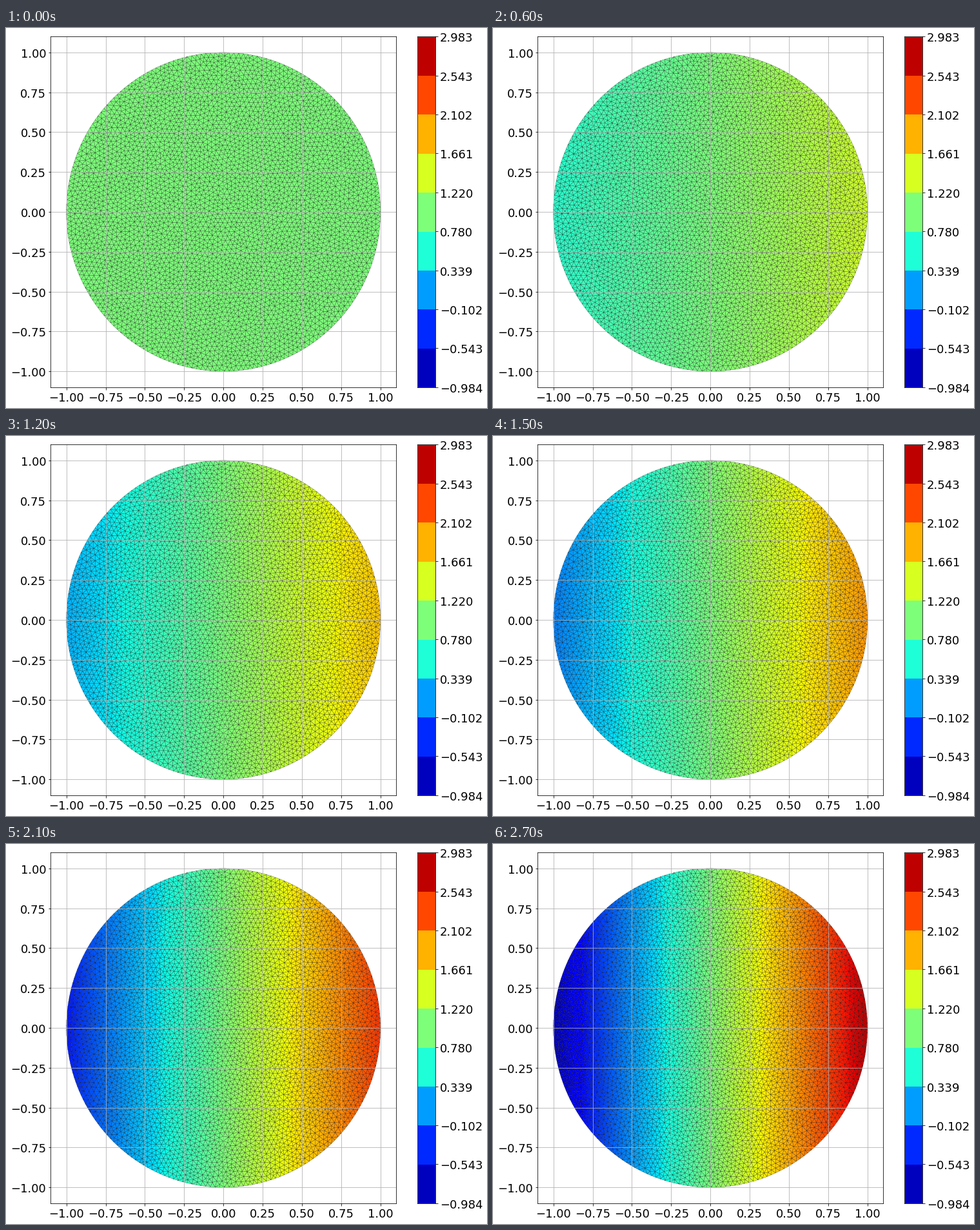
Animation of 746x589 px, one loop 3 s. Source, as a matplotlib script:

```python
import numpy as np
import matplotlib.pyplot as plt
from matplotlib.animation import FuncAnimation
from matplotlib.colors import ListedColormap
from matplotlib.transforms import ScaledTranslation
from matplotlib.tri import Triangulation

WIDTH, HEIGHT, DPI = 746, 589, 72
FRAMES, INTERVAL = 10, 300
VMIN, VMAX, BANDS = -0.9836, 2.9834, 9
EDGE = 0.03
TOP, AXES_HEIGHT = 13.2, 543.6

plt.rcParams.update({"font.family": "DejaVu Sans", "font.size": 18})


def disk_mesh(edge, relax_steps=12, seed=4):
    """Irregular, evenly graded triangulation of the unit disk."""
    rng = np.random.default_rng(seed)
    cell = edge * np.sqrt(np.sqrt(3) / 2)
    axis = np.arange(-1, 1, cell)
    inner = np.stack(np.meshgrid(axis, axis), axis=-1).reshape(-1, 2)
    inner = inner + rng.uniform(0, cell, inner.shape)
    inner = inner[np.hypot(*inner.T) < 1 - 0.55 * edge]

    angle = np.linspace(0, 2 * np.pi, round(2 * np.pi / edge), endpoint=False)
    rim = np.column_stack([np.cos(angle), np.sin(angle)])
    points = np.vstack([rim, inner])
    count = len(points)

    for _ in range(relax_steps):
        cells = Triangulation(*points.T).triangles
        a, b, c = (points[cells[:, i]] for i in range(3))
        u, v = b - a, c - a
        area = np.abs(u[:, 0] * v[:, 1] - u[:, 1] * v[:, 0])
        center = (a + b + c) / 3
        node = cells.ravel()

        def gather(values):
            return np.bincount(node, np.repeat(values, 3), minlength=count)

        moved = np.column_stack([gather(area * center[:, i]) for i in range(2)])
        moved /= gather(area)[:, None]
        points[len(rim):] = moved[len(rim):]

    return Triangulation(*points.T)


def place_axes(left, width):
    return fig.add_axes([left / WIDTH, 1 - (TOP + AXES_HEIGHT) / HEIGHT,
                         width / WIDTH, AXES_HEIGHT / HEIGHT])


def shift(right, down):
    """Offset in pixels."""
    return ScaledTranslation(right / DPI, -down / DPI, fig.dpi_scale_trans)


def set_ticks(axis, values, digits):
    labels = [f"{v:.{digits}f}".replace("-", "\u2212") for v in values]
    axis.set_ticks(values, labels)
    for label in axis.get_ticklabels():
        label.set_transform(label.get_transform() + shift(0, 1))


fig = plt.figure(figsize=(WIDTH / DPI, HEIGHT / DPI), dpi=DPI, facecolor="white")
ax = place_axes(69.3, 535.68)
bar = place_axes(638.46, 27.18)

mesh = disk_mesh(EDGE)
cell_x = mesh.x[mesh.triangles].mean(axis=1)
surface = ax.tripcolor(mesh, facecolors=np.ones_like(cell_x), cmap="jet",
                       vmin=VMIN, vmax=VMAX, edgecolors="k", linewidth=0.25)
ax.set(xlim=(-1.1, 1.1), ylim=(-1.1, 1.1))
for axis in (ax.xaxis, ax.yaxis):
    set_ticks(axis, np.linspace(-1, 1, 9), 2)
ax.grid(True)

levels = np.linspace(VMIN, VMAX, BANDS + 1)
band_colors = plt.get_cmap("jet")((np.arange(BANDS) + 0.5) / BANDS)
bar.pcolormesh([0, 1], levels, np.arange(BANDS)[:, None],
               cmap=ListedColormap(band_colors),
               transform=bar.transData + shift(0.4, 0.4))
bar.set(xlim=(0, 1), ylim=(VMIN, VMAX), xticks=[])
bar.yaxis.tick_right()
set_ticks(bar.yaxis, levels, 3)


def update(frame):
    time = frame / FRAMES
    surface.set_array(1 + 2 * time * cell_x)
    return (surface,)


anim = FuncAnimation(fig, update, frames=FRAMES, interval=INTERVAL,
                     repeat=True, repeat_delay=0, blit=False)
plt.show()
```
